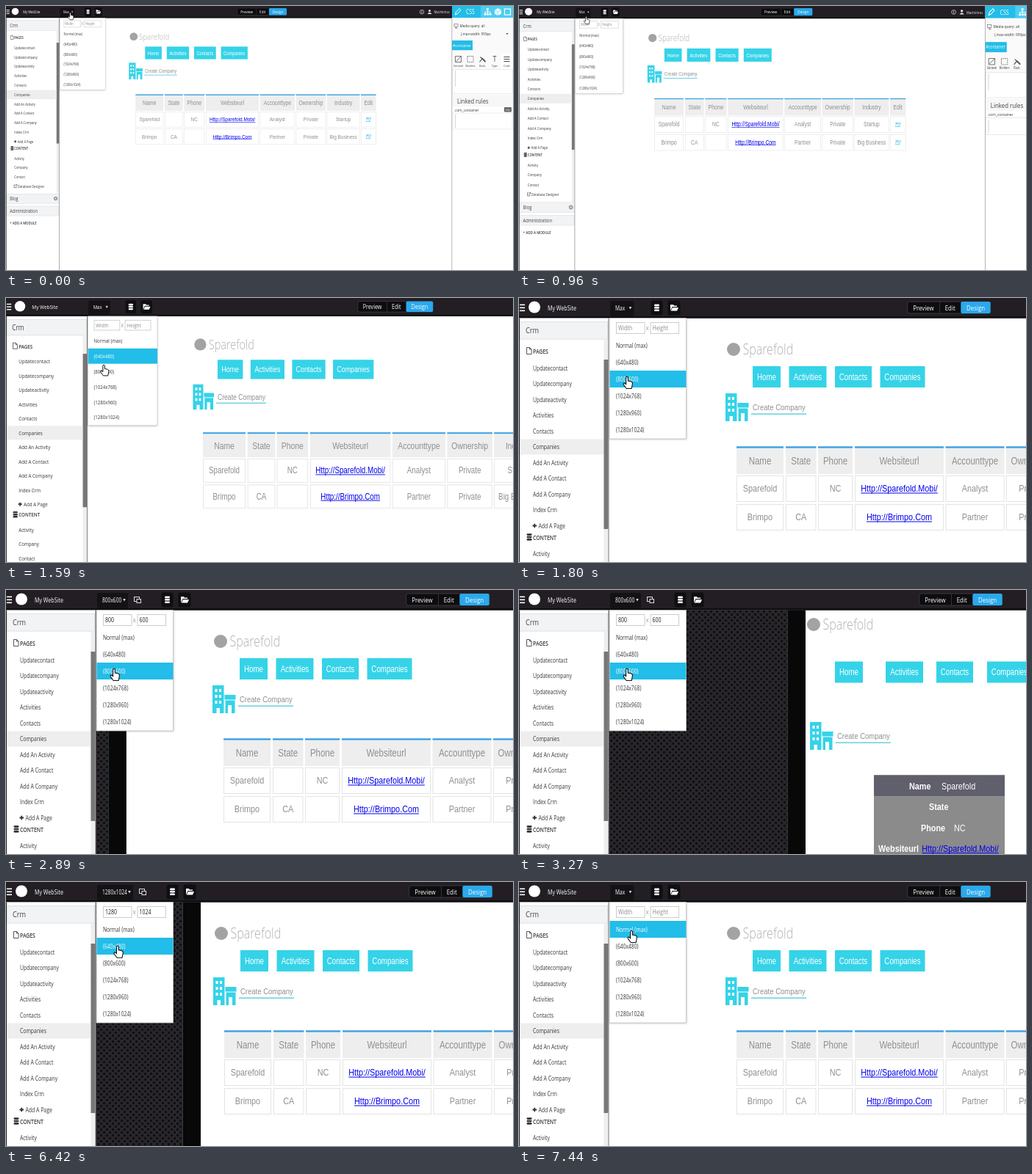
Write an HTML page with a canvas that moves like this. It is 690x360 px and loops after 8670 ms.

```html
<!DOCTYPE html>
<html lang="en">
<head>
<meta charset="utf-8">
<title>Responsive page editor</title>
<style>
html, body { margin: 0; width: 100%; height: 100%; overflow: hidden; background: #fff; }
canvas { display: block; width: 690px; height: 360px; }
</style>
</head>
<body>
<canvas id="stage" width="690" height="360"></canvas>
<script>
const ctx = document.getElementById('stage').getContext('2d');
const LOOP = 8670;
const ZOOM = 1.68;      // final zoom; the scene is laid out at this scale
const SQUEEZE = 0.82;
const UI = '"Open Sans", sans-serif';
const WEB = '"Liberation Sans", Arial, sans-serif';
const CYAN = '#35d3e8', BLUE = '#22bde8', BAR = '#221e24', INK = '#383838', GREY = '#8f8f8f';
const SIDE = 122, BAR_H = 27.5;
const ROW_TOP = 53, ROW_H = 23;

function rect(x, y, w, h, fill) {
  ctx.fillStyle = fill;
  ctx.fillRect(x, y, w, h);
}
function box(x, y, w, h, stroke, lw = 1) {
  ctx.strokeStyle = stroke;
  ctx.lineWidth = lw;
  ctx.strokeRect(x, y, w, h);
}
function round(x, y, w, h, r, fill) {
  ctx.beginPath();
  ctx.roundRect(x, y, w, h, r);
  ctx.fillStyle = fill;
  ctx.fill();
}
function disc(x, y, r, fill) {
  ctx.beginPath();
  ctx.arc(x, y, r, 0, Math.PI * 2);
  ctx.fillStyle = fill;
  ctx.fill();
}
function path(d, stroke, lw = 1, fill) {
  const p = new Path2D(d);
  if (fill) { ctx.fillStyle = fill; ctx.fill(p); }
  if (stroke) { ctx.strokeStyle = stroke; ctx.lineWidth = lw; ctx.stroke(p); }
}
function at(x, y, draw) {
  ctx.save();
  ctx.translate(x, y);
  draw();
  ctx.restore();
}
// y is the visual middle of the capitals; returns the drawn width
function text(str, x, y, size, color, { font = UI, weight = 400, align = 'left' } = {}) {
  let width;
  at(x, y + size * 0.36, () => {
    ctx.scale(SQUEEZE, 1);
    ctx.font = `${weight} ${size}px ${font}`;
    ctx.textAlign = align;
    ctx.fillStyle = color;
    ctx.fillText(str, 0, 0);
    width = ctx.measureText(str).width * SQUEEZE;
  });
  return width;
}
function link(str, x, y) {
  const w = text(str, x, y, 13.2, '#00e', { font: WEB, align: 'center' });
  rect(x - w / 2, y + 6, w, 1, '#00e');
}

const weave = (() => {
  const c = document.createElement('canvas');
  c.width = c.height = 8;
  const g = c.getContext('2d');
  g.fillStyle = '#29262b';
  g.fillRect(0, 0, 8, 8);
  g.fillStyle = '#100f11';
  for (const d of [0, 4]) g.fillRect(d, d, 3, 3);
  return ctx.createPattern(c, 'repeat');
})();

/* ---- timing ---- */

const clamp = v => Math.min(1, Math.max(0, v));
const lerp = (a, b, p) => a + (b - a) * p;
const smooth = p => p * p * (3 - 2 * p);
const stepped = (t, start, end, n) => clamp(Math.floor((t - start) / (end - start) * n + 1e-6) / n);

function along(keys, v) {
  for (let i = 1; i < keys.length; i++) {
    const [a, ya] = keys[i - 1], [b, yb] = keys[i];
    if (v <= b) return lerp(ya, yb, (v - a) / (b - a));
  }
  return keys[keys.length - 1][1];
}

function stateAt(t) {
  const k = Math.min(30, Math.max(0, Math.floor((t - 930) / 30) + 1));
  const s = { zoom: lerp(1, ZOOM, k / 30), size: null, left: SIDE, shift: 0, group: 0, cx: 147 };
  s.cy = along([[0, 15], [10, 54.8], [23, 100.5], [27, 107]], k);
  if (t >= 2730 && t < 4970) {
    Object.assign(s, { size: [800, 600], shift: 32, group: 16 });
    s.left = lerp(SIDE, 390, smooth(stepped(t, 2730, 3270, 8)));
  } else if (t >= 4970 && t < 7030) {
    Object.assign(s, { size: [1280, 1024], shift: 39, group: 20, left: 265 });
  } else if (t >= 7030) {
    s.left = lerp(265, SIDE, smooth(stepped(t, 7030, 7440, 7)));
  }
  if (t >= 4970) {
    const p = smooth(clamp((Math.floor((t - 6060) / 30) + 1) / 18));
    s.cx = lerp(147, 153, p);
    s.cy = lerp(176, 66, p);
  }
  return s;
}

/* ---- edited page ---- */

function logo(x, y) {
  disc(x, y, 9, '#a3a3a3');
  text('Sparefold', x + 12.5, y, 19.5, '#b0b0b0', { weight: 300 });
}

// each button takes its own width plus the gap, or one fixed pitch
function nav(x, y, gap, pitch) {
  const items = [['Home', 38], ['Activities', 51], ['Contacts', 50], ['Companies', 61]];
  for (const [label, w] of items) {
    rect(x, y, w, 29, CYAN);
    text(label, x + w / 2, y + 14.5, 11.9, '#fff', { font: WEB, align: 'center' });
    x += pitch || w + gap;
  }
}

function createCompany(x, y) {
  at(x, y, () => {
    rect(0, 0, 15.5, 38, CYAN);
    for (let r = 0; r < 3; r++)
      for (let c = 0; c < 2; c++) rect(3.5 + c * 5.5, 5 + r * 8, 3, 4, '#fff');
    rect(5.5, 31, 4.5, 7, '#fff');
    rect(16.5, 13, 15, 6.5, CYAN);
    rect(17.5, 20.5, 13, 17.5, CYAN);
    rect(21, 27, 5, 11, '#fff');
    text('Create Company', 37, 19, 11.6, GREY, { font: WEB });
    rect(35, 27.5, 75, 1.4, '#5ccbe0');
  });
}

const COLUMNS = [
  [296, 360, 'Name', 'Sparefold', 'Brimpo'], [363, 404.5, 'State', '', 'CA'],
  [407, 454, 'Phone', 'NC', ''], [457, 578, 'Websiteurl', 'Http://Sparefold.Mobi/', 'Http://Brimpo.Com'],
  [580.5, 660.5, 'Accounttype', 'Analyst', 'Partner'], [663, 731, 'Ownership', 'Private', 'Private'],
  [733.5, 809, 'Industry', 'Startup', 'Big Business'], [811.5, 846, 'Edit', '', '']
];

function table() {
  for (const [a, b, head, ...cells] of COLUMNS) {
    const mid = (a + b) / 2;
    rect(a, 202.3, b - a, 2.4, '#3a9fe0');
    rect(a, 205, b - a, 35, '#eee');
    text(head, mid, 222, 14, GREY, { font: WEB, align: 'center' });
    cells.forEach((cell, i) => {
      const y = 259.5 + i * 39;
      box(a + 0.5, y - 17, b - a - 1, 35, '#e4e4e4');
      if (head === 'Websiteurl') link(cell, mid, y);
      else if (head === 'Edit') at(mid, y, () => path('M-6 5H5M-5 3L-2-4L1 2M2 4L6-3M-6-3H6', '#4fc6ea', 1.3));
      else text(cell, mid, y, 13.2, GREY, { font: WEB, align: 'center' });
    });
  }
}

function card() {
  rect(483, 252, 178, 29, '#605f6c');
  rect(483, 252, 178, 1, '#8a8992');
  rect(483, 281, 178, 79, '#8b8b8b');
  const rows = [['Name', 531, 'Sparefold', 575], ['State', 558, '', 0], ['Phone', 547, 'NC', 592], ['Websiteurl', 489, '', 0]];
  rows.forEach(([label, x, value, vx], i) => {
    const y = 267 + i * 28.4;
    text(label, x, y, 13.2, '#fff', { font: WEB, weight: 700 });
    text(value, vx, y, 13.2, '#fff', { font: WEB });
  });
  link('Http://Sparefold.Mobi/', 600.5, 352.2);
}

function page(left) {
  if (left > SIDE) {
    rect(SIDE, BAR_H, left - SIDE, 340, weave);
    rect(left - 24, BAR_H, 24, 340, '#080808');
    rect(left - 25, BAR_H, 1, 340, '#2b3a3a');
  }
  rect(left, BAR_H, 1100, 600, '#fff');
  if (left > 348) {
    at(left - 390, 0, () => {
      logo(401, 47);
      nav(430, 97.5, 0, 69);
      createCompany(396, 180);
      card();
    });
  } else {
    at(Math.max(0, left - 264), 0, () => {
      logo(292, 70);
      nav(318, 93, 11.5);
      createCompany(281, 130);
      table();
    });
  }
}

/* ---- editor chrome ---- */

function database(x, y, color) {
  for (let i = -1; i < 2; i++) round(x - 3.5, y + i * 3.4 - 1.3, 7, 2.6, 1.3, color);
}

function sidebar() {
  rect(0, BAR_H, SIDE, 600, '#fff');
  const header = (label, y, h) => {
    rect(1, y, SIDE - 2, h, '#f1f3f5');
    box(1.5, y + 0.5, SIDE - 3, h - 1, '#dfe2e5');
    text(label, 9, y + h / 2, 11.2, '#444');
  };
  header('Crm', 32, 24.5);
  rect(115.5, 57, 6, 372, '#eee');
  rect(115.5, 84, 6, 231, '#777');
  at(13.5, 72, () => path('M-3-4.5H1L3.5-2V4.5H-3ZM1-4.5V-2H3.5', '#555'));
  text('PAGES', 19, 72.8, 8.4, INK, { weight: 600 });
  rect(1, 192.5, 114, 21, '#eee');
  ['Updatecontact', 'Updatecompany', 'Updateactivity', 'Activities', 'Contacts', 'Companies',
    'Add An Activity', 'Add A Contact', 'Add A Company', 'Index Crm'
  ].forEach((s, i) => text(s, 19, 95.8 + i * 21.5, 8.4, INK));
  path('M18.5 310.5H24M21.2 307.7V313.3', '#333', 1.8);
  text('Add A Page', 26.5, 310.8, 8.4, INK);
  database(14, 326, '#333');
  text('CONTENT', 19, 326.5, 8.4, INK, { weight: 600 });
  ['Activity', 'Company', 'Contact'].forEach((s, i) => text(s, 19, 349.3 + i * 21.3, 8.4, INK));
  path('M21 409.5H18.5V416H24V413M21 413L25 409M22.5 409H25V411.5', '#444');
  text('Database Designer', 27, 413, 8.4, INK);
  header('Blog', 430, 23);
  disc(113.5, 441, 4.5, '#999');
  disc(113.5, 441, 1.7, '#f1f3f5');
  header('Administration', 458, 23);
  text('+ ADD A MODULE', 9, 497, 8.8, INK, { weight: 600 });
  rect(SIDE - 0.5, BAR_H, 1, 600, '#777');
  rect(0, BAR_H, 1, 600, '#222');
}

function topBar(s) {
  rect(0, 0, 1160, BAR_H, BAR);
  rect(0, BAR_H - 2.5, 1160, 2.5, '#0d0f10');
  for (let i = 0; i < 3; i++) rect(1, 8.5 + i * 4, 7, 1.6, '#fff');
  disc(21, 12.5, 8, '#fff');
  text('My WebSite', 39, 13.5, 8.7, '#fff');

  const label = s.size ? s.size.join('x') : 'Max';
  const arrow = s.size ? s.shift + 129 : 151.5;
  round(124, 4, arrow - 119, 21, 2, '#151216');
  text(label, 131, 13.7, 8.1, '#fff');
  path(`M${arrow - 1.8} 12H${arrow + 1.8}L${arrow} 15.5Z`, null, 0, '#ddd');
  if (s.size) at(s.shift + 147, 13.5, () => {
    box(-4.5, -4, 7, 6, '#ddd');
    rect(-1, -1, 6, 5, BAR);
    box(-1, -1, 5.5, 5, '#ddd');
  });
  at(s.shift, 0, () => {
    round(179.5, 3.5, 16, 20, 3, '#0f0e10');
    database(187.5, 13.3, '#fff');
    round(202.5, 3.5, 17, 20, 3, '#0f0e10');
    path('M206 17.5V9H210L211 10.5H215V12H208.5Z', null, 0, '#fff');
    path('M209 13H217L215 17.5H206.8Z', null, 0, '#fff');
  });
  at(s.group, 0, () => {
    round(528.7, 5, 113, 16, 3, '#0d0c0e');
    ctx.lineWidth = 0.7;
    ctx.strokeStyle = '#49454c';
    ctx.stroke();
    rect(572, 5.5, 0.7, 15, '#49454c');
    round(601.3, 5, 40.4, 16, 2, '#2aa9ec');
    text('Preview', 550.5, 13.2, 9.6, '#fff', { align: 'center' });
    text('Edit', 586.7, 13.2, 9.6, '#fff', { align: 'center' });
    text('Design', 621.5, 13.2, 9.6, '#fff', { align: 'center' });
  });
}

function menu(s) {
  ctx.save();
  ctx.shadowColor = 'rgba(0,0,0,.3)';
  ctx.shadowBlur = 3;
  ctx.shadowOffsetY = 1;
  rect(123, BAR_H, 104.5, 164.5, '#fff');
  ctx.restore();
  box(123, BAR_H, 104.5, 164.5, '#c4c4c4', 0.8);
  ['Width', 'Height'].forEach((hint, i) => {
    const x = 132.5 + i * 46.5;
    box(x, 33.5, 38.5, 15, '#ccc');
    text(s.size ? String(s.size[i]) : hint, x + 2.5, 41, 8.5, s.size ? '#222' : '#8a8a8a');
  });
  text('X', 172.7, 41, 8, '#888');
  const active = Math.floor((s.cy - 2 - ROW_TOP) / ROW_H);
  ['Normal (max)', '(640x480)', '(800x600)', '(1024x768)', '(1280x960)', '(1280x1024)'].forEach((item, i) => {
    const y = ROW_TOP + i * ROW_H;
    if (i === active) rect(123.5, y, 104, ROW_H, BLUE);
    text(item, 132, y + 11.7, 8.2, i === active ? '#fff' : INK);
  });
}

// laid out at zoom 1
function inspector() {
  ctx.save();
  ctx.scale(ZOOM, ZOOM);
  ctx.strokeStyle = '#ddd';
  ctx.lineWidth = 0.7;
  ctx.beginPath();
  ctx.arc(566, 8, 2.8, 0, 7);
  ctx.stroke();
  rect(565.6, 6.3, 0.8, 3.4, '#ddd');
  disc(576.5, 6.5, 1.6, '#ddd');
  path('M573.5 11Q576.5 6.5 579.5 11Z', null, 0, '#ddd');
  text('Machintruc', 582.5, 8.3, 5, '#eee');

  rect(607, 0, 83, 360, '#fff');
  rect(607, 0, 83, 16, BLUE);
  rect(646, 0, 44, 16, '#4dcdf0');
  path('M611.5 12L612.5 8L617 3.5L619 5.5L614.5 10.5Z', '#fff', 1);
  text('CSS', 626, 8, 8.4, '#fff');
  path('M655.5 4V8M652 11V8H659V11M655.5 8V11', '#fff', 0.9);
  for (const [x, y] of [[654, 3], [650.7, 10], [654.2, 10], [657.7, 10]]) rect(x, y, 2.8, 2.5, '#fff');
  path('M669.5 3L674 5.5V10.5L669.5 13L665 10.5V5.5Z', null, 0, '#fff');
  path('M665 5.5L669.5 8L674 5.5M669.5 8V13', '#4dcdf0', 0.7);
  box(678.5, 4, 8, 8, '#fff', 1.2);

  rect(607, 16, 83, 44.5, '#fafafa');
  box(610, 24.5, 5, 3.5, '#666', 0.6);
  path('M612.5 28V31M615 30H611', '#666', 0.6);
  text('Media query: all', 617.5, 27, 5.6, INK);
  text('(.max-width: 959px', 619, 37.5, 5.6, INK);
  path('M680.5 37H683.5L682 39Z', null, 0, '#444');
  rect(607, 47, 28, 13.5, BLUE);
  text('#container', 608, 53.8, 6, '#fff');

  rect(607, 60.5, 83, 25.5, '#fafafa');
  rect(673.5, 65, 16.5, 21, '#fff');
  ['General', 'Borders', 'Back.', 'Type', 'Code'].forEach((tab, i) => {
    const x = 615.5 + i * 16.5;
    at(x, 72.5, () => {
      if (i === 0) path('M-4-4H4V4H-4ZM-3 3L4-4', '#555', 0.8);
      if (i === 1) {
        ctx.setLineDash([1.5, 1]);
        box(-4, -4, 8, 8, '#555', 0.8);
      }
      if (i === 2) path('M-4 4L0-1L4 3M-3-3L4 4', '#555', 1.2);
      if (i === 3) text('T', 0, 0, 11, '#444', { align: 'center' });
      if (i === 4) path('M-4-3H4M-4 0H4M-4 3H4', '#444', 1);
    });
    text(tab, x, 81, 4.3, INK, { align: 'center' });
  });
  rect(607, 86, 83, 34, '#fff');
  box(607.5, 86.5, 82, 33, '#ddd', 0.6);
  rect(611, 88, 0.6, 22, '#bbb');
  rect(607, 121, 83, 16, '#f7f7f7');
  text('Linked rules', 614, 130, 9.2, '#444');
  text('.com_container', 610, 141.5, 5.7, INK);
  round(678, 138, 10, 6.5, 1, '#666');
  text('Edit', 683, 141.3, 4, '#fff', { align: 'center' });
  box(608, 146, 81, 22, '#ddd', 0.6);
  rect(611, 148, 0.6, 18, '#bbb');
  rect(606.5, 16, 0.7, 345, '#999');
  ctx.restore();
}

function pointer(x, y) {
  at(x, y, () => path(
    'M-1.4 1.2Q0-.8 1.4 1.2V6L5.8 7Q7.8 7.6 7.4 10L6.2 16.5H-.8L-4.8 11Q-5 8.8-3.2 9.2L-1.4 10.6Z',
    '#111', 1.1, '#fff'));
}

function draw(t) {
  const s = stateAt(t);
  ctx.setTransform(1, 0, 0, 1, 0, 0);
  rect(0, 0, 690, 360, '#fff');
  ctx.scale(s.zoom / ZOOM, s.zoom / ZOOM);
  page(s.left);
  topBar(s);
  sidebar();
  inspector();
  menu(s);
  pointer(s.cx, s.cy);
}

const start = performance.now();
function tick() {
  draw((performance.now() - start) % LOOP);
  requestAnimationFrame(tick);
}
draw(0);
requestAnimationFrame(tick);
</script>
</body>
</html>
```
